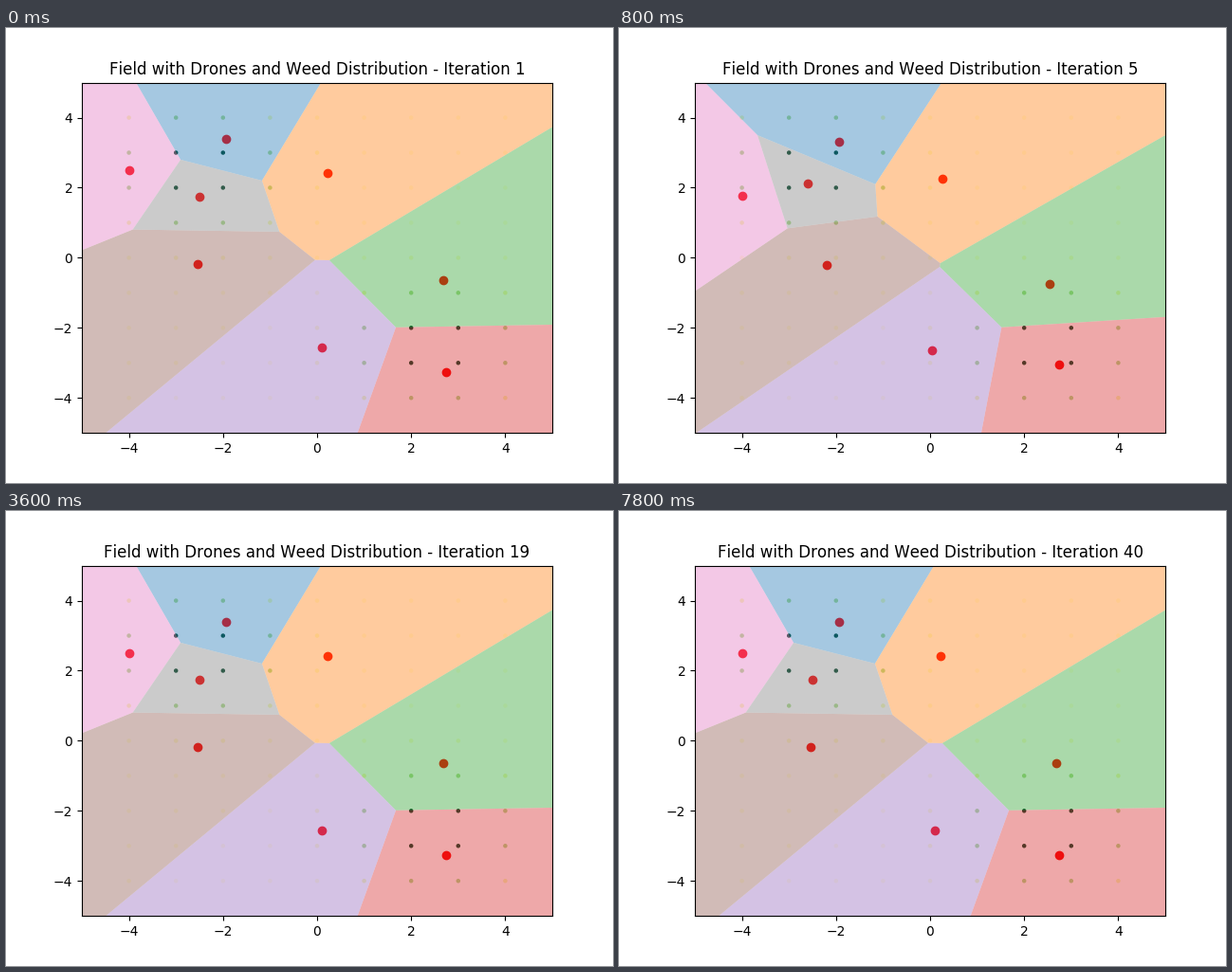
Animation of 640x480 px, one loop 8 s. Source, as a matplotlib script:

```python
import numpy as np
import matplotlib.pyplot as plt
from matplotlib.animation import FuncAnimation

plt.rcParams["text.kerning_factor"] = 6

# Waypoints of each drone, reached at the iterations in KEYS;
# a drone with a shorter path rests at its last point.
KEYS = (2, 4, 7, 8)
PATHS = {
    "tab:blue": [(-1.17, 3.06), (-1.92, 3.22), (-1.93, 3.39)],
    "tab:orange": [(0.40, 1.82), (0.34, 2.19), (0.20, 2.30), (0.22, 2.425)],
    "tab:green": [(3.21, -0.73), (2.38, -0.86), (2.685, -0.65)],
    "tab:red": [(2.22, -2.69), (2.745, -2.735), (2.745, -3.275)],
    "tab:purple": [(-0.02, -2.76), (-0.02, -2.76), (0.10, -2.56)],
    "tab:brown": [(-1.51, -1.51), (-1.75, -0.24), (-2.54, -0.18)],
    "tab:pink": [(-3.26, -0.05), (-3.99, 0.87), (-4.0, 2.5)],
    "tab:gray": [(-2.42, 1.65), (-2.72, 2.25), (-2.5, 2.0), (-2.5, 1.735)],
}


def position(path, step):
    """Ease out from waypoint to waypoint; step 1 shows the settled layout."""
    pts = np.array(path + path[-1:] * (len(KEYS) - len(path)))
    if step < KEYS[0] or step >= KEYS[-1]:
        return pts[-1]
    k = np.searchsorted(KEYS, step, side="right") - 1
    u = (step - KEYS[k]) / (KEYS[k + 1] - KEYS[k])
    return pts[k] + (pts[k + 1] - pts[k]) * (1 - (1 - u) ** 2)


def layout(step):
    return np.array([position(path, step) for path in PATHS.values()])


def clip(poly, mid, normal):
    """Keep the part of poly on the side of mid away from normal."""
    side = [(p - mid) @ normal for p in poly]
    out = []
    for i, p in enumerate(poly):
        q, a, b = poly[i - 1], side[i - 1], side[i]
        if (a <= 0) != (b <= 0):
            out.append(q + (p - q) * a / (a - b))
        if b <= 0:
            out.append(p)
    return out


def cell(pts, k):
    """Voronoi cell of point k, cut from a box larger than the axes."""
    poly = [np.array(c, float) for c in ((-6, -6), (6, -6), (6, 6), (-6, 6))]
    for j, p in enumerate(pts):
        if j != k:
            poly = clip(poly, (p + pts[k]) / 2, p - pts[k])
    return np.array(poly)


def bump(x, y, cx, cy):
    return np.exp(-((x - cx) ** 2 + (y - cy) ** 2) / 2)


fig = plt.figure(figsize=(6.4, 4.8), dpi=100)
ax = fig.add_subplot()
ax.set_xlim(-5, 5)
ax.set_ylim(-5, 5)

gx, gy = np.meshgrid(np.arange(-4, 5), np.arange(-4, 5))
weeds = bump(gx, gy, -2.5, 2.5) + bump(gx, gy, 2.5, -2.5)
ax.scatter(gx.ravel(), gy.ravel(), c=weeds.ravel(), cmap="YlGn", s=5)

start = layout(1)
drones = ax.scatter(*start.T, color="red", s=36)
cells = [ax.fill(*cell(start, k).T, color=c, alpha=0.4, lw=0)[0]
         for k, c in enumerate(PATHS)]
title = ax.set_title("")


def update(i):
    step = i + 1
    pts = layout(step)
    drones.set_offsets(pts)
    for k, patch in enumerate(cells):
        patch.set_xy(cell(pts, k))
    title.set_text(f"Field with Drones and Weed Distribution - Iteration {step}")
    return [drones, title, *cells]


anim = FuncAnimation(fig, update, frames=40, interval=200, repeat=True,
                     repeat_delay=0, blit=False)
plt.show()
```
